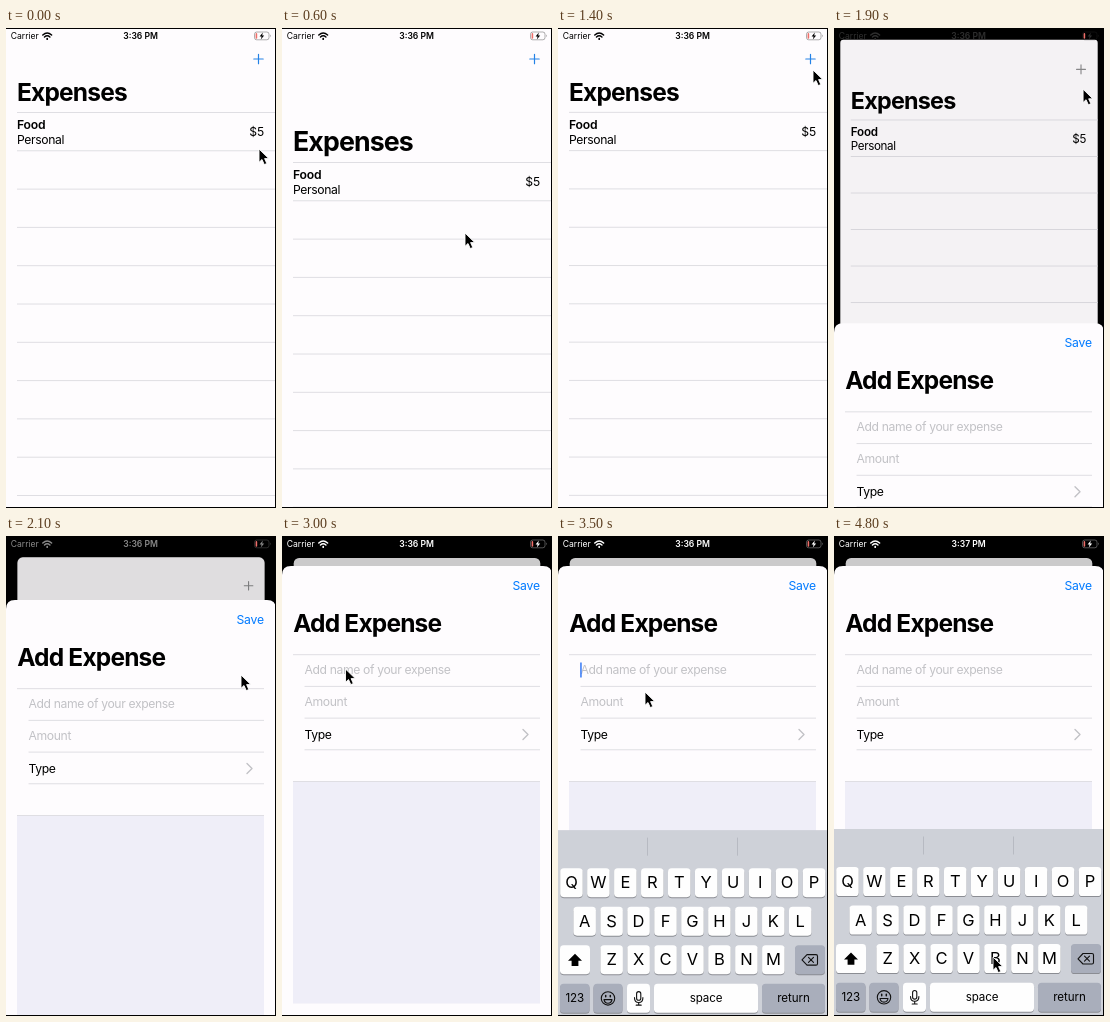
Write an HTML page that moves like this. It is 270 px wide and 480 px high and loops after 5000 ms.

```html
<!DOCTYPE html>
<html lang="en">
<head>
<meta charset="utf-8">
<title>Expenses</title>
<style>
html, body { margin: 0; width: 100%; height: 100%; overflow: hidden; background: #000; }
svg { display: block; width: 270px; height: 480px; font: 12.2px Inter, Roboto, sans-serif; letter-spacing: -.38px; }
.title { font-size: 24.5px; font-weight: 700; letter-spacing: -.82px; }
.bold { font-weight: 600; }
.bar { font-size: 8.6px; letter-spacing: 0; }
.wide { letter-spacing: -.2px; }
.hint { fill: #c2c2c6; }
.mid { text-anchor: middle; }
.end { text-anchor: end; }
.rule { stroke: #dfdee3; }
.line { fill: none; stroke-linecap: round; stroke-linejoin: round; }
.key { font-size: 16.5px; letter-spacing: 0; }
.small { font-size: 11.6px; letter-spacing: -.1px; }
</style>
</head>
<body>
<svg viewBox="0 0 270 480">
  <rect width="270" height="480"/>

  <g id="base">
    <rect id="card" width="270" height="490" fill="#fefcfe"/>
    <path id="plus" class="line" d="M247.8 31h9.4M252.5 26.3v9.4" stroke-width="1.2"/>
    <g id="list">
      <g id="heading"><text class="title">Expenses</text></g>
      <g id="rules" class="rule"></g>
      <text class="bold wide" x="11" y="100.700">Food</text>
      <text x="11" y="115.300">Personal</text>
      <text class="end wide" x="258" y="107.800">$5</text>
    </g>
    <rect id="dim" width="270" height="490"/>
  </g>

  <g id="sheet">
    <path d="M0 500V39q0-9 9-9h252q9 0 9 9v461z" fill="#fefcfe"/>
    <text class="end wide" x="257.8" y="54" fill="#007aff">Save</text>
    <text class="title" x="11.2" y="96">Add Expense</text>
    <rect x="11" y="245.5" width="247" height="222" fill="#efeef8"/>
    <path class="rule" d="M11 118.7h247M22.5 150.4H258M22.5 182.1H258M22.5 213.8H258M11 245.5h247"/>
    <text class="hint" x="22.5" y="138">Add name of your expense</text>
    <text class="hint" x="22.5" y="170.2">Amount</text>
    <text x="22.5" y="202.6">Type</text>
    <path class="line" d="M241 193.5l5 5-5 5" stroke="#c2c2c6" stroke-width="1.4"/>
    <rect id="caret" x="22.2" y="126.5" width="1.5" height="15" fill="#3478f6"/>
  </g>

  <g id="keyboard">
    <rect y="293" width="270" height="190" fill="#ced1d8"/>
    <path d="M89.5 300.5v18M179.5 300.5v18" stroke="#b7bac2"/>
    <g id="keys"></g>
    <path d="M17 416.5l7 7h-3.6v5.3h-6.8v-5.3H10z"/>
    <g class="line" stroke="#111" stroke-width="1.1">
      <path d="M249 417.5h9q1.5 0 1.5 1.5v7.5q0 1.5-1.5 1.5h-9l-5-5.2zM250.5 420.2l5 5M255.5 420.2l-5 5"/>
      <circle cx="50" cy="461.3" r="6.7"/>
      <path d="M46 462.5h8q-.5 3.6-4 3.6t-4-3.6z"/>
      <path d="M47.7 458.3v1.4M52.3 458.3v1.4" stroke-width="1.5"/>
      <rect x="78.6" y="454.5" width="4.2" height="8.6" rx="2.1"/>
      <path d="M76.5 460.5q0 4.8 4.2 4.8t4.2-4.8M80.7 465.3v2.7M78.2 468h5"/>
    </g>
  </g>

  <g id="status" class="bar">
    <text x="4.7" y="11.2">Carrier</text>
    <text id="clock" class="bold mid" x="134.6" y="11.2"></text>
    <g class="line" stroke="currentColor" stroke-width="1.5">
      <path d="M36.8 7q4.400-4 8.800 0M38.500 9q2.700-2.400 5.400 0"/>
      <path d="M41.2 10.500v.7" stroke-width="1.700"/>
    </g>
    <rect x="248.500" y="4" width="14.500" height="7.800" rx="2.200" fill="none" stroke="currentColor" stroke-opacity=".4" stroke-width=".8"/>
    <path d="M264.200 6.600q1.300 1.300 0 2.600z" fill-opacity=".5"/>
    <rect x="249.600" y="5.100" width="1.600" height="5.600" rx=".8" fill="#ee6f6a"/>
    <path d="M256.800 4.600l-3.200 4h2l-.8 3 3.400-4.200h-2z"/>
  </g>

  <path d="M0 .5h270M269.500 0v480M0 479.500h270" stroke="#000"/>
  <path id="cursor" d="M0 0v13.300l3-2.800 2.300 5.100 2.500-1.100-2.200-4.900h4.200z" stroke="#fff" stroke-width=".9"/>
</svg>

<script>
const LOOP = 5000, STEP = 100;
const RELEASE = 650, PRESENT = 1800, TYPE = 3100, MINUTE = 4600;
const $ = id => document.getElementById(id);
const clamp = v => Math.min(1, Math.max(0, v));
const place = (id, x, y, scale = 1) =>
  $(id).setAttribute('transform', `translate(${x} ${y}) scale(${scale})`);

// Remaining distance of a critically damped spring, 1 to 0
function spring(ms, rate) {
  const k = Math.max(0, ms) / 1000 * rate;
  return (1 + k) * Math.exp(-k);
}

// Pointer stops: time, x, y
const path = [
  [0, 253, 121], [200, 205, 130], [300, 190, 142], [600, 183, 205],
  [700, 183, 178], [900, 187, 99], [1400, 255, 42], [1600, 256, 30],
  [1800, 254, 34], [2100, 235, 139], [2500, 125, 149], [2800, 64, 133],
  [3200, 63, 133], [3500, 87, 156], [3800, 140, 270], [4100, 185, 395],
  [4300, 158, 417], [4800, 159, 421]
];

function pointer(t) {
  const i = path.findIndex(p => p[0] > t);
  if (i < 0) return path[path.length - 1].slice(1);
  const [a, b] = [path[i - 1], path[i]];
  const k = (t - a[0]) / (b[0] - a[0]);
  const ease = k * k * (3 - 2 * k);
  return [1, 2].map(n => a[n] + (b[n] - a[n]) * ease);
}

function pull(t) {
  return t < RELEASE ? .4 + 50 * clamp((t - 250) / 350) : 50.4 * spring(t - RELEASE, 10);
}

function key(x, y, width, label = '', fill = '#fefefe', style = 'key') {
  const base = y + (style === 'key' ? 20.3 : 18.5);
  return `<rect x="${x}" y="${y + 1}" width="${width}" height="29" rx="3.6" fill="#8b8d93"/>
    <rect x="${x}" y="${y}" width="${width}" height="29" rx="3.6" fill="${fill}"/>
    <text class="mid ${style}" x="${x + width / 2}" y="${base}">${label}</text>`;
}

function build() {
  $('rules').innerHTML = Array.from({ length: 11 }, (_, i) =>
    `<path d="M11 ${84.1 + 38.3 * i}h259"/>`).join('');
  const grey = '#a9aebb', white = '#fefefe';
  const letters = [['QWERTYUIOP', 2.2, 331], ['ASDFGHJKL', 15.4, 369.5], ['ZXCVBNM', 42.4, 408]]
    .map(([row, x, y]) => [...row].map((c, i) => key(x + 26.95 * i, y, 22.5, c)).join(''));
  $('keys').innerHTML = letters.join('') +
    key(2, 408, 30) + key(237, 408, 30, '', grey) +
    key(2, 446.7, 29.5, '123', grey, 'small') + key(35.5, 446.7, 29, '', grey) +
    key(69, 446.7, 23) + key(96, 446.7, 104, 'space', white, 'small') +
    key(204, 446.7, 63, 'return', grey, 'small');
}

function draw(t) {
  const y = pull(t);
  place('list', 0, y);
  place('heading', 11, 72.8, 1 + y * .0018);

  const shown = 1 - spring(t - PRESENT, 18);
  const scale = 1 - .087 * shown;
  place('base', 135 * (1 - scale), 22 * shown, scale);
  $('card').setAttribute('rx', 6 * shown);
  $('dim').setAttribute('rx', 6 * shown);
  $('dim').setAttribute('opacity', .2 * clamp((t - PRESENT) / 500));
  $('plus').setAttribute('stroke', t > PRESENT ? '#8c8c8e' : '#2482e6');
  place('sheet', 0, 452 * spring(t - PRESENT, 14.15));

  const tone = Math.round(255 * clamp((t - PRESENT) / 560));
  $('status').style.color = $('status').style.fill = `rgb(${tone},${tone},${tone})`;
  $('clock').textContent = t < MINUTE ? '3:36 PM' : '3:37 PM';

  place('keyboard', 0, 188 * spring(t - TYPE, 18));
  const blink = clamp(.5 + 1.2 * Math.cos((t - 4400) / 500 * Math.PI));
  $('caret').setAttribute('opacity', t > TYPE ? blink : 0);
  place('cursor', ...pointer(t));
}

// The screen refreshes ten times a second
function tick() {
  draw(Math.floor(performance.now() % LOOP / STEP) * STEP);
  requestAnimationFrame(tick);
}

build();
tick();
</script>
</body>
</html>
```
